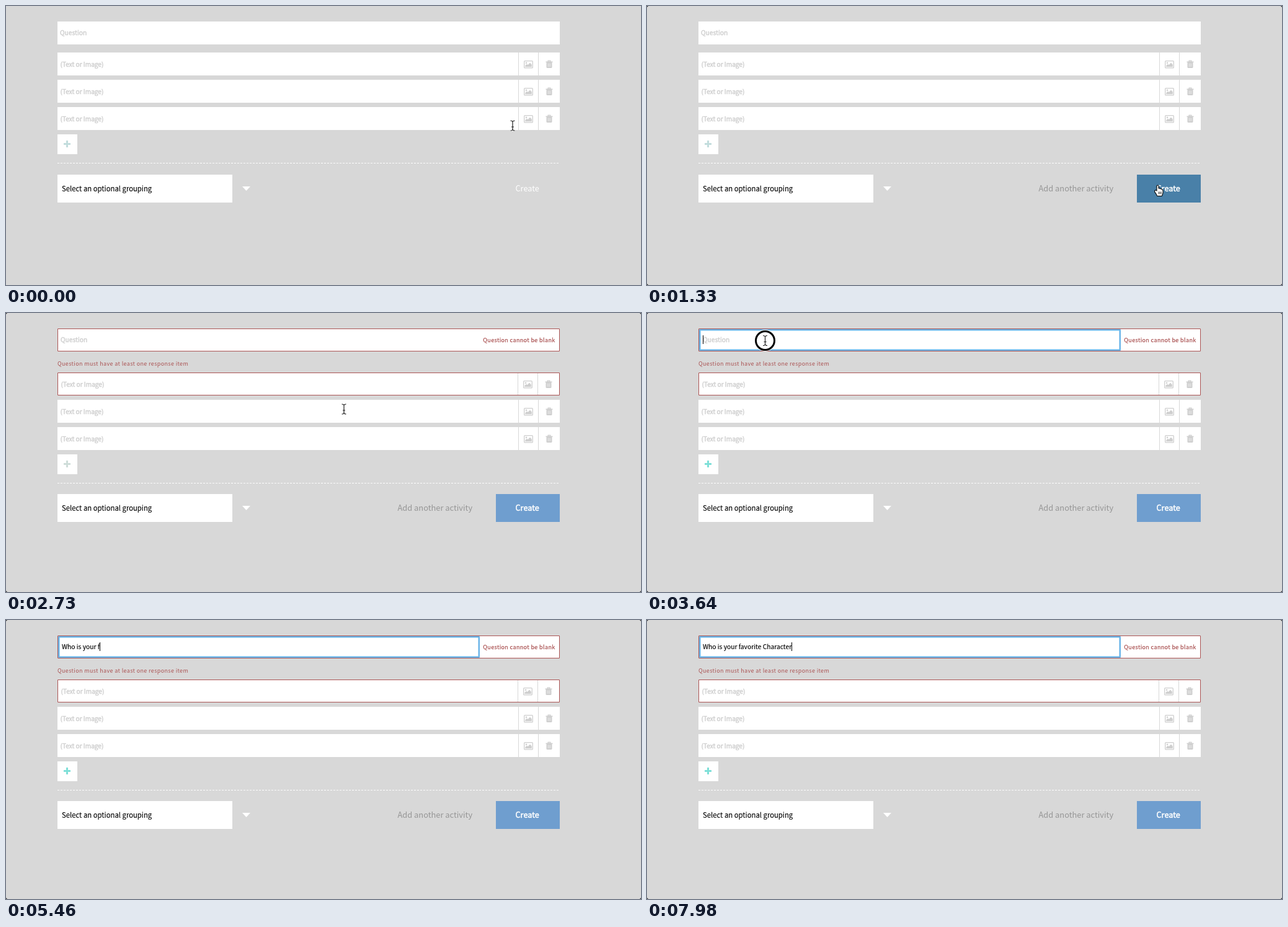
Write an HTML page with a canvas that moves like this. It is 1024x450 px and loops after 8000 ms.

```html
<!DOCTYPE html>
<html lang="en">
<head>
<meta charset="utf-8">
<title>Question form</title>
<style>
html, body { margin: 0; width: 100%; height: 100%; overflow: hidden; background: #d8d8d8; }
canvas { display: block; }
</style>
</head>
<body>
<canvas id="stage" width="1024" height="450"></canvas>
<script>
const c = document.getElementById('stage').getContext('2d');
const LOOP = 8000, STEP = 70;
const ERRORS = 1540, FOCUS = 3360, TYPING = 4000;
const FONT = '"Noto Sans CJK JP", "Noto Sans CJK SC", "Noto Sans CJK", "Open Sans", sans-serif';
const RED = '#ab5454', GREY = '#cfcfcf', LINE = '#d8d8d8';
const QUESTION = 'Who is your favorite Character';

// Key points: time, then values; straight lines between them.
const typed = [[TYPING, 0], [5460, 13.1], [6370, 21.1], [7900, 30]];
const mouse = [[0, 817, 193], [140, 817, 197], [560, 825, 292], [700, 825, 297], [1540, 825, 297],
  [1750, 770, 270], [2450, 552, 158], [2730, 545, 155], [3150, 210, 52], [3290, 190.5, 44.5]];

function along(keys, t) {
  if (t <= keys[0][0]) return keys[0].slice(1);
  for (let i = 1; i < keys.length; i++) {
    const a = keys[i - 1], b = keys[i];
    if (t <= b[0]) {
      const k = (t - a[0]) / (b[0] - a[0]);
      return a.slice(1).map((v, n) => v + (b[n + 1] - v) * k);
    }
  }
  return keys[keys.length - 1].slice(1);
}

function box(x, y, w, h, color) {
  c.fillStyle = color;
  c.fillRect(x, y, w, h);
}

function frame(x, y, w, h, color, line) {
  c.strokeStyle = color;
  c.lineWidth = line;
  c.strokeRect(x + line / 2, y + line / 2, w - line, h - line);
}

// `heavy` is an outline that thickens the regular weight.
function text(s, x, y, size, color, heavy = 0, spacing = 0) {
  c.font = size + 'px ' + FONT;
  c.letterSpacing = spacing + 'px';
  c.fillStyle = c.strokeStyle = color;
  c.fillText(s, x, y);
  if (heavy) {
    c.lineWidth = heavy;
    c.lineJoin = 'round';
    c.strokeText(s, x, y);
  }
  const width = c.measureText(s).width;
  c.letterSpacing = '0px';
  return width;
}

function shape(points, fill, stroke, line = 1) {
  const p = new Path2D('M' + points + 'Z');
  if (stroke) {
    c.strokeStyle = stroke;
    c.lineWidth = line;
    c.lineJoin = 'round';
    c.stroke(p);
  }
  c.fillStyle = fill;
  c.fill(p);
}

function at(x, y, draw) {
  c.save();
  c.translate(x, y);
  draw();
  c.restore();
}

function imageIcon() {
  c.strokeStyle = GREY;
  c.lineWidth = 1.3;
  c.beginPath();
  c.roundRect(.7, .7, 13.6, 11.2, 1);
  c.stroke();
  shape('2.3 10.3V8.3L5 5.6L6.5 7.1L10 3.6L12.8 6.4V10.3', GREY);
  c.beginPath();
  c.arc(4.1, 3.7, 1.3, 0, 7);
  c.fill();
}

function trashIcon() {
  c.strokeStyle = c.fillStyle = GREY;
  c.lineWidth = 1.2;
  c.strokeRect(4, .6, 4, 2);
  c.fillRect(.5, 2, 11, 1.6);
  c.beginPath();
  c.roundRect(1.5, 3, 9, 9.5, 1.5);
  c.fill();
  for (const x of [3.7, 5.6, 7.5]) box(x, 5, .8, 5.4, '#eeeeee');
}

function response(y, bad) {
  const d = bad ? 1 : 0;
  box(83, y, 810, 37, '#fff');
  text('(Text or Image)', 87.5 + d, y + 22.5, 10.1, GREY, .45);
  box(826 - d, y, 1, 37, LINE);
  box(858 - d, y, 1, 37, LINE);
  at(835 - d, y + 13, imageIcon);
  at(870 - d, y + 12.5, trashIcon);
  if (bad) frame(83, y, 810, 37, RED, 1);
}

function question(t) {
  const bad = t >= ERRORS, focus = t >= FOCUS;
  const count = Math.floor(along(typed, t)[0]);
  box(83, 25, 810, 37, '#fff');
  if (bad) {
    frame(83, 25, 810, 37, RED, 1);
    text('Question cannot be blank', 769.3, 47, 9, RED, .25, .37);
    text('Question must have at least one response item', 83, 85, 9, RED, 0, .36);
  }
  if (focus) frame(84, 26, 680, 35, '#6bb5e8', 2.5);
  const x = focus ? 90 : bad ? 88 : 87;
  if (!count) text('Question', x, 47, 10.25, GREY, .45);
  if (focus) {
    const width = text(QUESTION.slice(0, count), x, 47, 10.28, '#000', .15);
    box(Math.round(x + width), 36, 1, 14, '#000');
  }
}

function footer(t, y) {
  box(83, y, 282, 45, '#fff');
  text('Select an optional grouping', 90, y + 27, 11.3, '#000', .1);
  shape(`381 ${y + 19}H394L387.5 ${y + 26}`, '#fff');
  if (t >= STEP) {
    text('Add another activity', 631.5, y + 27, 12.85, '#969696');
    const hover = t >= 560 && t < 1680;
    box(790, y, 103, 45, hover ? '#4980a8' : '#6f9ecf');
  }
  text('Create', 821.5, y + 27, 12.7, '#fff', t < STEP ? 0 : .5);
}

function iBeam() {
  const p = new Path2D('M-3.5-8Q0-8 0-5.5Q0-8 3.5-8M0-5.5V5.5M-3.5 8Q0 8 0 5.5Q0 8 3.5 8M-2 2H2');
  for (const [color, line] of [['#fff', 2.6], ['#222', 1.2]]) {
    c.strokeStyle = color;
    c.lineWidth = line;
    c.stroke(p);
  }
}

function hand() {
  shape('-2.5 2V-6.5Q-1.5-8.5-.5-6.5V-2Q1-3.5 2-1.5Q3.5-2.7 4.3-.8Q6.2-1.5 6.5 1V4Q6 6 5 9H-2Q-3 6-5.5 3Q-6.5 .5-4.5 .5Z',
    '#fff', '#000', 2.2);
  for (const x of [-.3, 1.7, 3.7]) box(x, 2.5, .8, 4, '#000');
}

function arrow() {
  shape('0 0V14L3.3 11L5.5 16L7.8 15L5.6 10.2H10', '#000', '#fff', 2);
}

function pointer(t, shift) {
  if (t >= TYPING) return;
  const [x, y] = along(mouse, t);
  if (t >= 3290 && t < 3780) {
    const r = 15 + 8 * Math.max(0, 1 - (t - 3290) / 140);
    c.beginPath();
    c.arc(x, y, r, 0, 7);
    c.fillStyle = '#fff';
    c.fill();
    for (const [color, line] of [['#fff', 5], ['#000', 3]]) {
      c.strokeStyle = color;
      c.lineWidth = line;
      c.stroke();
    }
  }
  const onButton = x > 790 && y > 272 + shift;
  const onField = y < 62 || x < 826 && y > 75 + shift && y < 200 + shift;
  at(x, y, onButton ? hand : onField ? iBeam : arrow);
}

function draw(t) {
  const bad = t >= ERRORS, shift = bad ? 21 : 0;
  box(0, 0, 1024, 450, t < STEP ? '#d7d7d7' : '#000');
  if (t >= STEP) {
    c.fillStyle = '#d8d8d8';
    c.beginPath();
    c.roundRect(0, 0, 1024, 450, 3);
    c.fill();
  }
  question(t);
  for (let i = 0; i < 3; i++) response(75 + shift + 44 * i, bad && !i);

  const y = 207 + shift;
  const plus = t >= FOCUS ? '#7fe0d8' : bad ? '#cfddd9' : '#c3dddd';
  box(83, y, 32, 32, '#fff');
  box(93, y + 14, 11, 3, plus);
  box(97, y + 10, 3, 11, plus);

  for (let x = 83; x < 893; x += 5) box(x, 253 + shift, 3, 1, '#fff');
  footer(t, bad ? 292 : 272);
  pointer(t, shift);
}

function tick() {
  draw(Math.floor(performance.now() % LOOP / STEP) * STEP);
  requestAnimationFrame(tick);
}
tick();
</script>
</body>
</html>
```
